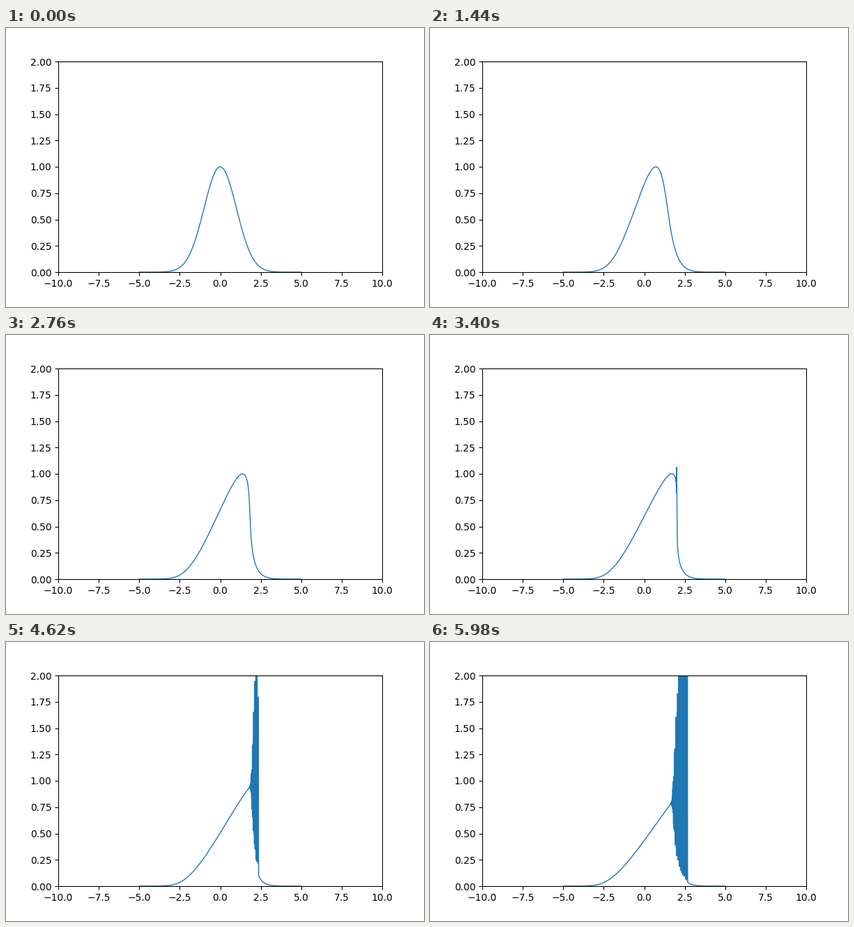
A matplotlib script for the animation above (6000 ms loop, 600 px wide and 400 px high).

```python
import numpy as np
import matplotlib.pyplot as plt
from matplotlib.animation import FuncAnimation

FRAMES = 300
DT = 0.01      # model time per frame
SUBSTEPS = 20

x = np.linspace(-5, 5, 1000)
dx = x[1] - x[0]


def slope(u):
    """Inviscid Burgers equation with centred differences."""
    du = np.zeros_like(u)
    du[1:-1] = -u[1:-1] * (u[2:] - u[:-2]) / (2 * dx)
    return du


def rk4(u, h):
    k1 = slope(u)
    k2 = slope(u + h / 2 * k1)
    k3 = slope(u + h / 2 * k2)
    k4 = slope(u + h * k3)
    return u + h / 6 * (k1 + 2 * k2 + 2 * k3 + k4)


def solve():
    u = np.exp(-x**2 / 2)
    states = [u]
    for _ in range(FRAMES - 1):
        for _ in range(SUBSTEPS):
            u = rk4(u, DT / SUBSTEPS)
        states.append(u)
    return states


waves = solve()

fig, ax = plt.subplots(figsize=(6, 4), dpi=100)
fig.subplots_adjust(left=0.125, right=0.9, bottom=0.125, top=0.88)
ax.set_xlim(-10, 10)
ax.set_ylim(0, 2)
line, = ax.plot(x, waves[0], lw=1)


def update(i):
    line.set_ydata(waves[i])
    return line,


anim = FuncAnimation(fig, update, frames=FRAMES, interval=20,
                     repeat=True, repeat_delay=0)
plt.show()
```
